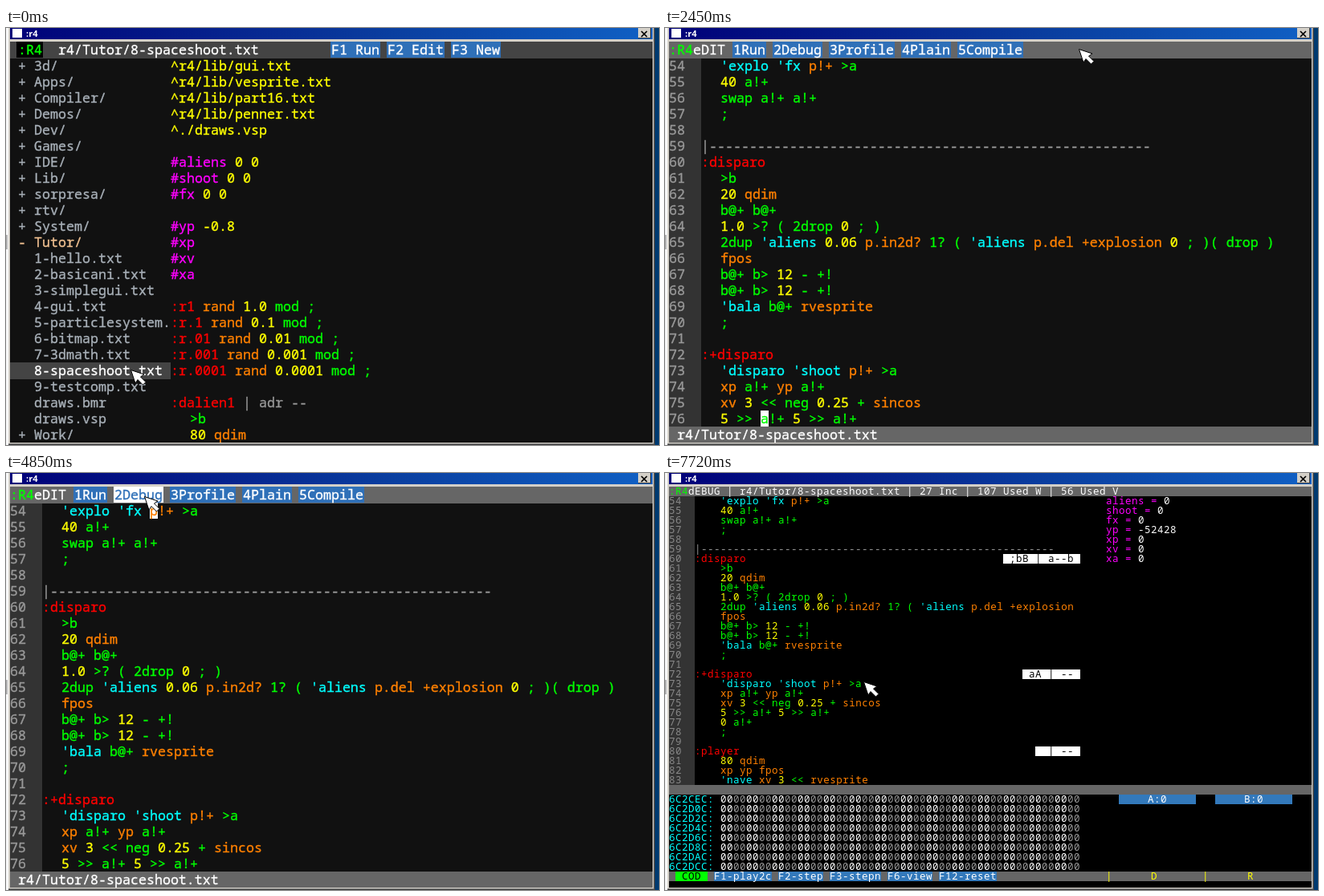
An HTML page for the animation above (8 s loop, 813 by 520 pixels).

```html
<!DOCTYPE html>
<html lang="en">
<head>
<meta charset="utf-8">
<title>:r4</title>
<style>
html, body { margin: 0; width: 100%; height: 100%; overflow: hidden; background: #f4f4f4; }
#stage { position: absolute; width: 813px; height: 520px; overflow: hidden; }
#stage div, #stage span.at, #mouse { position: absolute; white-space: pre; }
#desk { left: 807px; width: 6px; height: 520px; background: #003a70; }
#behind { left: 0; top: 258px; width: 2px; height: 18px; background: #b0b0b0; }
#win { left: 2px; top: 0; width: 806px; height: 520px; background: #d4d0c8;
  box-shadow: inset 1px 0 #fff, inset -1px -1px #404040, inset -2px -2px #808080; }
#bar { left: 5px; top: 0; width: 800px; height: 14px; background: linear-gradient(90deg, #000078, #0a3fa0 60%, #1060c4); }
#icon { left: 8px; top: 1px; width: 12px; height: 11px; background: #fff; }
#name { left: 25px; top: 0; font: bold 11px/14px "Open Sans", sans-serif; color: #fff; }
#close { left: 787px; top: 0; width: 16px; height: 13px; background: #d4d0c8; box-shadow: inset -1px -1px #404040; }
.scene { left: 5px; top: 17px; width: 800px; height: 500px; overflow: hidden; }
.big { background: #111; font: 16.667px/20px "Noto Sans Mono", monospace; -webkit-text-stroke: .35px; }
.small { background: #000; font: 12.5px/12px "Noto Sans Mono", monospace; letter-spacing: .5px; }
.btn { background: #2f70b8; color: #fff; }
.btn.hot { background: #fff; color: #2f70b8; }
</style>
</head>
<body>
<div id="stage">
  <div id="desk"></div>
  <div id="behind"></div>
  <div id="win"></div>
  <div id="bar"></div>
  <div id="icon"></div>
  <div id="name">:r4</div>
  <div id="close"><svg width="16" height="13"><path d="M4 3l7 7M11 3l-7 7" stroke="#000" stroke-width="1.7"/></svg></div>
  <div id="browse" class="scene big"></div>
  <div id="edit" class="scene big"></div>
  <div id="debug" class="scene small"></div>
  <svg id="mouse" width="24" height="24" style="left:0;top:0;overflow:visible">
    <path d="M.5 .5L17 6L12.5 9L19 15.5L15.5 19L9 12.5L6 17Z" fill="#fff" stroke="#000"/>
  </svg>
</div>
<script>
const $ = id => document.getElementById(id);
const browse = $('browse'), edit = $('edit'), debug = $('debug'), mouse = $('mouse');
const GREEN = '#0f0', RED = '#f00', ORANGE = '#ff8000', YELLOW = '#ff0', CYAN = '#0ff',
  PINK = '#f0f', GREY = '#999', WHITE = '#fff', BLUE = '#3379bb';
const LOOP = 8000, PATH = 'r4/Tutor/8-spaceshoot.txt';

// Stage coordinates; scenes start at 5,17.
function box(scene, x, y, w, h, color) {
  const el = document.createElement('div');
  el.style.cssText = `left:${x - 5}px;top:${y - 17}px;width:${w}px;height:${h}px;background:${color};overflow:hidden`;
  scene.append(el);
  return el;
}
function put(scene, x, y, text, color, bg = '') {
  const el = document.createElement('span');
  el.className = 'at';
  el.style.cssText = `left:${x - 5}px;top:${y - 17}px;color:${color};background:${bg}`;
  el.textContent = text;
  scene.append(el);
  return el;
}

const userWords = new Set('p!+ qdim p.in2d? p.del +explosion fpos rvesprite xp yp xv sincos rand'.split(' '));
const prefixes = { '|': GREY, '^': YELLOW, '#': PINK, ':': RED, "'": CYAN };
function hue(word) {
  if (/^-?\d+(\.\d+)?$/.test(word)) return YELLOW;
  return prefixes[word[0]] || (userWords.has(word) ? ORANGE : GREEN);
}
function code(scene, x, y, line, tab) {
  if (line[0] === '\t') x += tab;
  const row = put(scene, x, y, '', WHITE);
  for (const word of line.trim().match(/\|.*|\S+|\s+/g) || []) {
    const el = document.createElement('span');
    el.style.color = hue(word);
    el.textContent = word;
    row.append(el);
  }
}

const buttons = [];
function button(scene, x, label) {
  const el = put(scene, x, 17, label, '');
  el.style.cssText = `left:${x - 6}px;top:0;padding:0 1px`;
  el.classList.add('btn');
  buttons.push({ el, scene, x, end: x + label.length * 10 });
}

// File browser
box(browse, 5, 17, 800, 21, '#444');
box(browse, 13, 17, 33, 20, '#000');
put(browse, 15, 17, ':R4', GREEN);
put(browse, 65, 17, PATH, WHITE);
button(browse, 405, 'F1 Run');
button(browse, 475, 'F2 Edit');
button(browse, 555, 'F3 New');
const tree = box(browse, 5, 37, 200, 480, 'none');
box(tree, 5, 397, 200, 21, '#444');
`+ 3d/
+ Apps/
+ Compiler/
+ Demos/
+ Dev/
+ Games/
+ IDE/
+ Lib/
+ sorpresa/
+ rtv/
+ System/
- Tutor/
  1-hello.txt
  2-basicani.txt
  3-simplegui.txt
  4-gui.txt
  5-particlesystem.txt
  6-bitmap.txt
  7-3dmath.txt
  8-spaceshoot.txt
  9-testcomp.txt
  draws.bmr
  draws.vsp
+ Work/`.split('\n').forEach((name, i) =>
  put(tree, 15, 17 + i * 20, name, name[0] === '-' ? '#f0c090' : i === 19 ? WHITE : '#a8b0b8'));
`^r4/lib/gui.txt
^r4/lib/vesprite.txt
^r4/lib/part16.txt
^r4/lib/penner.txt
^./draws.vsp

#aliens 0 0
#shoot 0 0
#fx 0 0

#yp -0.8
#xp
#xv
#xa

:r1 rand 1.0 mod ;
:r.1 rand 0.1 mod ;
:r.01 rand 0.01 mod ;
:r.001 rand 0.001 mod ;
:r.0001 rand 0.0001 mod ;

:dalien1 | adr --
\t>b
\t80 qdim`.split('\n').forEach((line, i) => code(browse, 205, 37 + i * 20, line, 24));

// Editor and debugger share one listing
const listing = `\t'explo 'fx p!+ >a
\t40 a!+
\tswap a!+ a!+
\t;

|${'-'.repeat(55)}
:disparo
\t>b
\t20 qdim
\tb@+ b@+
\t1.0 >? ( 2drop 0 ; )
\t2dup 'aliens 0.06 p.in2d? 1? ( 'aliens p.del +explosion 0 ; )( drop )
\tfpos
\tb@+ b> 12 - +!
\tb@+ b> 12 - +!
\t'bala b@+ rvesprite
\t;

:+disparo
\t'disparo 'shoot p!+ >a
\txp a!+ yp a!+
\txv 3 << neg 0.25 + sincos
\t5 >> a!+ 5 >> a!+
\t0 a!+
\t;

:player
\t80 qdim
\txp yp fpos
\t'nave xv 3 << rvesprite`.split('\n');

box(edit, 5, 37, 40, 460, '#333');
box(edit, 5, 17, 800, 21, '#666');
box(edit, 5, 497, 800, 20, '#666');
put(edit, 5, 17, ':R4', GREEN);
put(edit, 35, 17, 'eDIT', WHITE);
button(edit, 85, '1Run');
button(edit, 135, '2Debug');
button(edit, 205, '3Profile');
button(edit, 295, '4Plain');
button(edit, 365, '5Compile');
listing.slice(0, 23).forEach((line, i) => {
  put(edit, 5, 37 + i * 20, 54 + i, GREY);
  code(edit, 45, 37 + i * 20, line, 24);
});
put(edit, 15, 497, PATH, WHITE);

box(debug, 5, 17, 800, 12, '#666');
box(debug, 5, 29, 32, 360, '#333');
box(debug, 5, 389, 800, 12, '#666');
box(debug, 5, 497, 800, 12, '#666');
put(debug, 5, 17, ':R4', GREEN);
put(debug, 29, 17, `dEBUG | ${PATH} | 27 Inc | 107 Used W | 56 Used V`, WHITE);
const view = box(debug, 5, 29, 512, 360, 'none');
listing.forEach((line, i) => {
  put(view, 5, 17 + i * 12, 54 + i, '#888');
  code(view, 37, 17 + i * 12, line, 32);
});
// Stack notes end flush at the right of the listing
[[101, ' ;bB | a--b '], [245, ' aA | -- '], [341, '  | -- ']].forEach(([y, note]) => {
  const w = note.length * 8;
  box(debug, 517 - w, y, w, 12, WHITE);
  put(debug, 517 - w, y, note, '#000');
});
['aliens', 'shoot', 'fx', 'yp', 'xp', 'xv', 'xa'].forEach((name, i) => {
  put(debug, 549, 29 + i * 12, name + ' =', PINK);
  put(debug, 549 + (name.length + 3) * 8, 29 + i * 12, name === 'yp' ? '-52428' : '0', WHITE);
});
for (let row = 0; row < 8; row++) {
  const y = 401 + row * 12, address = 0x6C2CEC + row * 32;
  put(debug, 5, y, address.toString(16).toUpperCase() + ':', CYAN);
  for (let i = 0; i < 28; i++) put(debug, 69 + i * 16, y, '00', i % 2 ? GREY : WHITE);
}
['A:0', 'B:0'].forEach((label, i) => {
  const el = box(debug, 565 + i * 120, 401, 96, 12, BLUE);
  el.textContent = label;
  el.style.color = WHITE;
  el.style.textAlign = 'center';
});
box(debug, 13, 497, 40, 12, GREEN);
put(debug, 21, 497, 'COD', '#000');
['F1-play2c', 'F2-step', 'F3-stepn', 'F6-view', 'F12-reset'].reduce((x, label) => {
  box(debug, x, 497, label.length * 8, 12, BLUE);
  put(debug, x, 497, label, WHITE);
  return x + (label.length + 1) * 8;
}, 61);
[[549, '|'], [605, 'D'], [669, '|'], [725, 'R']].forEach(([x, s]) => put(debug, x, 497, s, YELLOW));

// Blinking carets with the times at which they turn on and off
function caret(scene, x, y, w, h, char, color) {
  const el = box(scene, x, y, w, h, WHITE);
  el.textContent = char;
  el.style.color = color;
  return el;
}
const carets = [
  [caret(edit, 119, 477, 10, 20, 'a', GREEN), 2450, 2730, 3010, 3290, 3710, 3850, 4150, 4430],
  [caret(edit, 179, 37, 10, 20, 'p', ORANGE), 4850, 5270],
  [caret(debug, 157, 29, 8, 12, 'p', ORANGE), 5560, 6130, 6410, 6710, 6880, 7160],
  [caret(debug, 117, 41, 8, 12, '', WHITE), 7440, 7720]
];

// Pointer stops [ms, x, y]; it moves between them in ticks
const TICK = 143;
const stops = [
  [0, 155, 426], [290, 150, 434], [1170, 298, 220], [1310, 418, 136], [1450, 418, 136],
  [2010, 500, 24], [2450, 515, 26], [2590, 516, 26], [3010, 224, 170], [3150, 224, 170],
  [3560, 222, 159], [4290, 182, 42], [4560, 173, 30], [4710, 173, 30], [4850, 172, 29],
  [5270, 172, 29], [5850, 247, 260], [LOOP, 247, 260]
];
function pointerAt(t) {
  const i = stops.findIndex(s => s[0] > t);
  const [t0, x0, y0] = stops[i - 1], [t1, x1, y1] = stops[i];
  const n = Math.max(1, Math.round((t1 - t0) / TICK));
  const k = Math.floor((t - t0) / (t1 - t0) * n + 1e-6) / n;
  return [Math.round(x0 + (x1 - x0) * k), Math.round(y0 + (y1 - y0) * k)];
}

const show = (el, on) => { el.style.visibility = on ? 'inherit' : 'hidden'; };
function draw() {
  const t = performance.now() % LOOP;
  const scene = t < 2150 ? browse : t < 5270 ? edit : debug;
  for (const s of [browse, edit, debug]) show(s, s === scene);
  const [x, y] = pointerAt(t);
  mouse.style.transform = `translate(${x}px,${y}px)`;
  for (const b of buttons) {
    b.el.classList.toggle('hot', b.scene === scene && y >= 17 && y < 37 && x >= b.x && x < b.end);
  }
  for (const [el, ...times] of carets) show(el, times.filter(s => s <= t).length % 2);
  requestAnimationFrame(draw);
}
draw();
</script>
</body>
</html>
```
